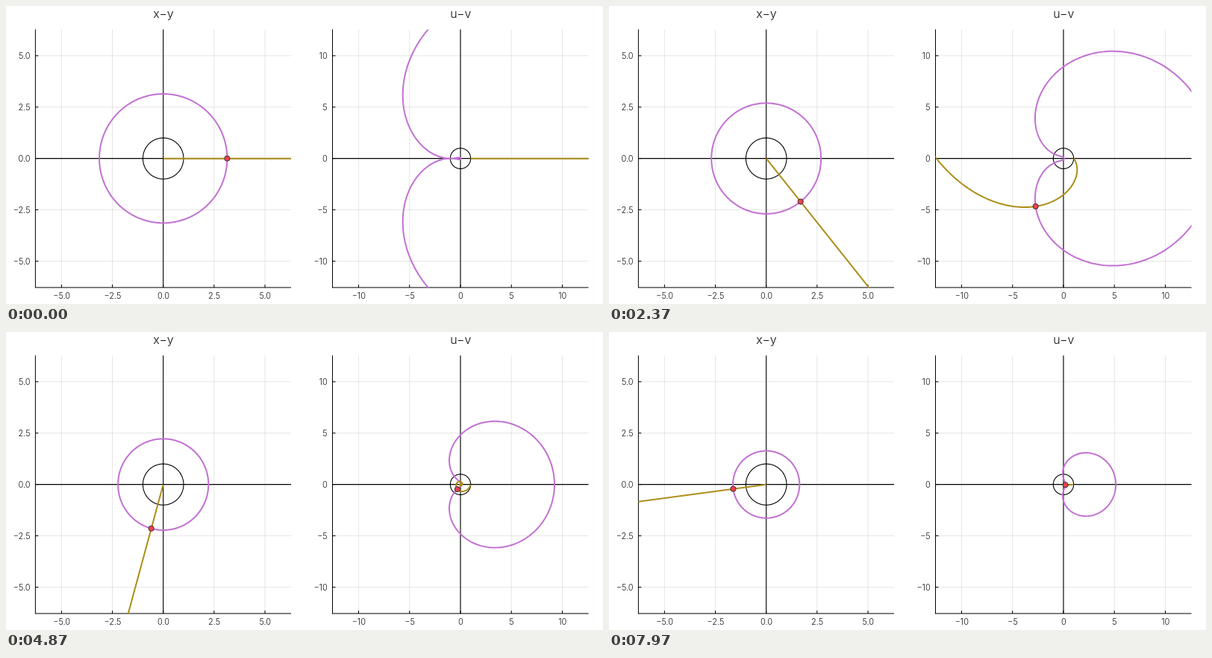
An HTML page with a canvas that plays this animation: 800x400 px, repeating every 8 s.

```html
<!DOCTYPE html>
<html lang="en">
<head>
<meta charset="utf-8">
<title>Complex exponential</title>
<style>
  html, body { margin: 0; width: 100%; height: 100%; overflow: hidden; background: #fff; }
  canvas { display: block; }
</style>
</head>
<body>
<canvas id="stage" width="800" height="400"></canvas>
<script>
const ctx = document.getElementById('stage').getContext('2d');
const TAU = 2 * Math.PI;
const LOOP = 8000, STEPS = 499;
const TOP = 31.4, BOTTOM = 377.9, MID = (TOP + BOTTOM) / 2;
const INK = '#000', PURPLE = '#c271d2', GOLD = '#ac8e18', RED = '#f0414f';
const FONT = 'Inter, "Open Sans", sans-serif';

const panels = [
  { title: 'x\u2212y', left: 39.4, right: 382, range: TAU, tick: 2.5, digits: 1 },
  { title: 'u\u2212v', left: 437.5, right: 780.5, range: 2 * TAU, tick: 5, digits: 0 }
];
for (const p of panels) {
  p.mid = (p.left + p.right) / 2;
  p.sx = (p.right - p.left) / 2 / p.range;
  p.sy = (BOTTOM - TOP) / 2 / p.range;
}

const polar = (r, a) => [r * Math.cos(a), r * Math.sin(a)];
const cexp = ([x, y]) => polar(Math.exp(x), y);
const toPixel = (p, [x, y]) => [p.mid + x * p.sx, MID - y * p.sy];

function line(x1, y1, x2, y2, color, width) {
  ctx.beginPath();
  ctx.moveTo(x1, y1);
  ctx.lineTo(x2, y2);
  ctx.strokeStyle = color;
  ctx.lineWidth = width;
  ctx.stroke();
}

function curve(p, points, color, width) {
  ctx.beginPath();
  for (const z of points) ctx.lineTo(...toPixel(p, z));
  ctx.strokeStyle = color;
  ctx.lineWidth = width;
  ctx.stroke();
}

function label(text, x, y, align, font) {
  ctx.font = font + ' ' + FONT;
  ctx.textAlign = align;
  ctx.fillStyle = '#111';
  ctx.fillText(text, x, y);
}

function circle(r, n = 600) {
  return Array.from({ length: n + 1 }, (_, i) => polar(r, TAU * i / n));
}

function drawAxes(p) {
  const ticks = [-2, -1, 0, 1, 2].map(i => i * p.tick);
  for (const v of ticks) {
    const [x, y] = toPixel(p, [v, v]);
    line(x, TOP, x, BOTTOM, 'rgba(0,0,0,0.1)', 1);
    line(p.left, y, p.right, y, 'rgba(0,0,0,0.1)', 1);
  }
  line(p.left, TOP, p.left, BOTTOM + 0.5, INK, 1);
  line(p.left, BOTTOM, p.right, BOTTOM, INK, 1);
  for (const v of ticks) {
    const [x, y] = toPixel(p, [v, v]);
    const text = v.toFixed(p.digits).replace('-', '\u2212');
    line(x, BOTTOM, x, BOTTOM - 4, INK, 1);
    line(p.left, y, p.left + 4, y, INK, 1);
    label(text, x + 0.3, 393, 'center', '300 11px');
    label(text, p.left - 6.8, y + 4.2, 'right', '300 11px');
  }
  label(p.title, p.mid + 0.3, 16, 'center', '300 16px');
  line(p.left, MID, p.right, MID, INK, 1.1);
  line(p.mid, TOP, p.mid, BOTTOM, INK, 1.1);
}

function drawMarker(p, z) {
  const [x, y] = toPixel(p, z);
  ctx.beginPath();
  ctx.arc(x, y, 3.6, 0, TAU);
  ctx.fillStyle = RED;
  ctx.fill();
  ctx.strokeStyle = '#333';
  ctx.lineWidth = 1;
  ctx.stroke();
}

function drawPanel(p, ring, ray, point) {
  drawAxes(p);
  ctx.save();
  ctx.beginPath();
  ctx.rect(p.left, TOP, p.right - p.left, BOTTOM - TOP);
  ctx.clip();
  curve(p, circle(1), INK, 1.1);
  curve(p, ring, PURPLE, 2);
  curve(p, ray, GOLD, 2);
  drawMarker(p, point);
  ctx.restore();
}

// Image of the ray, cut once it is well outside the panel.
function spiral(angle) {
  const points = [];
  for (let s = 0; s <= 100; s += 0.02) {
    const z = polar(s, angle);
    if (z[0] > 4) break;
    points.push(cexp(z));
  }
  return points;
}

// Steps last 30, 40 and 30 ms in turn.
function stepAt(ms) {
  const rest = ms % 100;
  return 3 * Math.floor(ms / 100) + (rest >= 30) + (rest >= 70);
}

function draw(step) {
  const radius = Math.PI * (1 - step / STEPS);
  const angle = -TAU * step / STEPS;
  const ring = circle(radius), point = polar(radius, angle);
  ctx.fillStyle = '#fff';
  ctx.fillRect(0, 0, 800, 400);
  ctx.lineJoin = 'round';
  drawPanel(panels[0], ring, [[0, 0], polar(100, angle)], point);
  drawPanel(panels[1], ring.map(cexp), spiral(angle), cexp(point));
}

const start = performance.now();
let shown = -1;
function tick() {
  const step = stepAt((performance.now() - start) % LOOP);
  if (step !== shown) draw(shown = step);
  requestAnimationFrame(tick);
}
tick();
</script>
</body>
</html>
```
